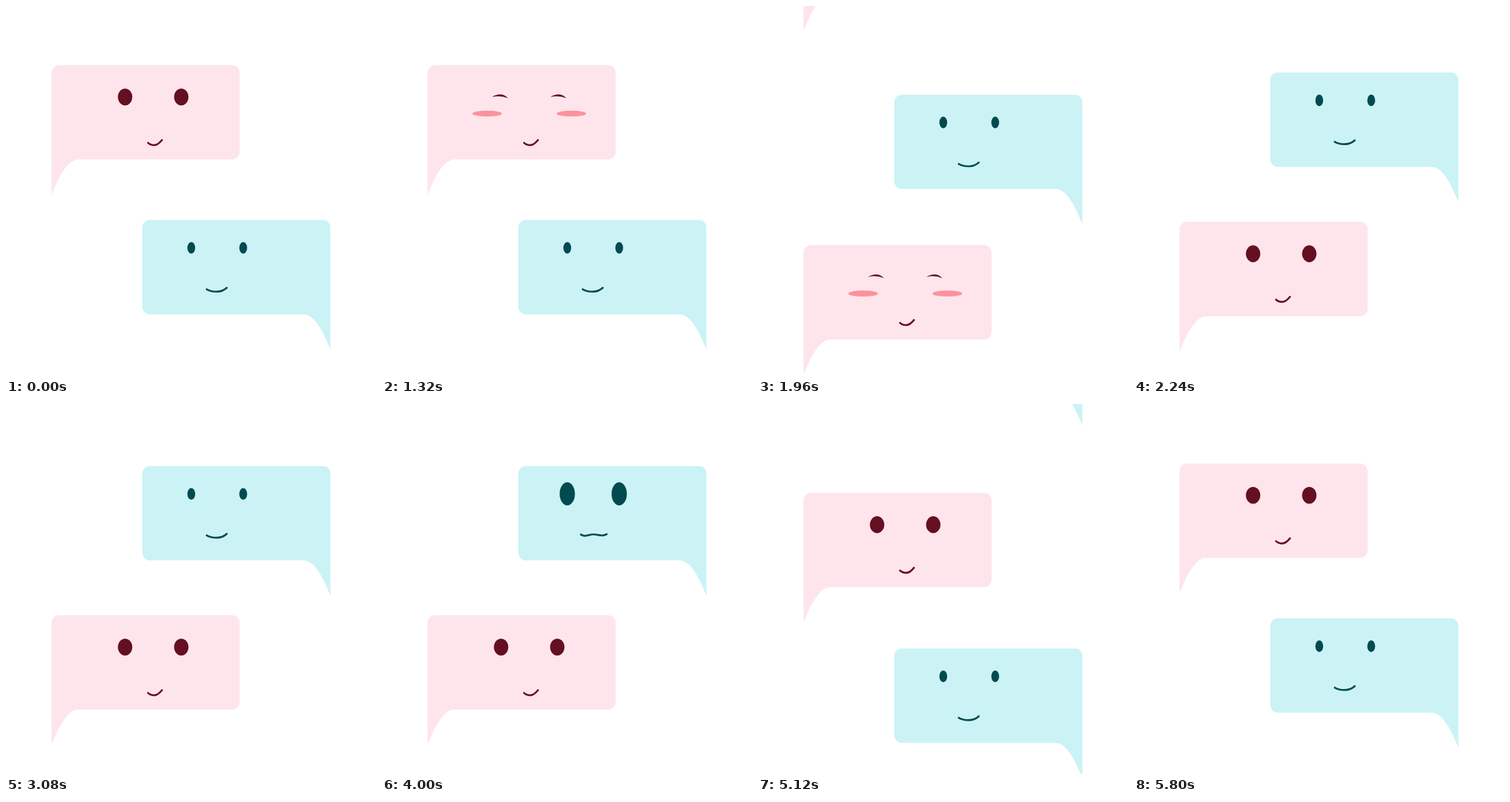
These frames come from a looping animation (540x540 px, 6.04 s). An HTML page with a canvas:

```html
<!DOCTYPE html>
<html lang="en">
<head>
<meta charset="utf-8">
<title>Chat bubbles</title>
<style>
  html, body { margin: 0; width: 100%; height: 100%; overflow: hidden; background: #fff; }
  canvas { display: block; }
</style>
</head>
<body>
<canvas id="stage" width="540" height="540"></canvas>
<script>
const ctx = document.getElementById('stage').getContext('2d');
const LOOP = 6040;
const PINK = { body: '#fee5eb', ink: '#641022', blush: '#fb929e' };
const BLUE = { body: '#cbf3f5', ink: '#004a50' };

// Start times of the four moves, in ms
const SMILE = 10, SCROLL_UP = 1560, WORRY = 3480, SCROLL_BACK = 4738;
const EYES_OPEN = 2000, BLUE_ENTERS = 4820;

// Resting tops of the bubbles
const PINK_HIGH = 86.3, PINK_LOW = 308.3, BLUE_HIGH = 90.5, BLUE_LOW = 312.3, BELOW = 540;
const PINK_GONE = -204, BLUE_GONE = -218;

const PINK_MOUTH = [206.5, 112.6, 209, 115.3, 212, 116.8, 216, 116.8, 221, 116.8, 225, 112.8, 228.3, 108.4];
const BLUE_SMILE = [292, 100.5, 296.5, 103.4, 302, 104.6, 307.5, 104.6, 313, 104.6, 318.5, 102.8, 323, 98.2];
const BLUE_WAVE = [289, 99.3, 296, 104.8, 301, 99.3, 309, 99.3, 316, 99.3, 322, 104, 329.5, 99];

const lerp = (a, b, k) => a + (b - a) * k;

// Critically damped spring from 0 to 1
function spring(ms, rate = 7.9) {
  const x = Math.max(0, ms) / 1000 * rate;
  return 1 - (1 + x) * Math.exp(-x);
}

function ellipse(x, y, rx, ry, color, alpha = 1) {
  ctx.globalAlpha = alpha;
  ctx.fillStyle = color;
  ctx.beginPath();
  ctx.ellipse(x, y, rx, ry, 0, 0, Math.PI * 2);
  ctx.fill();
  ctx.globalAlpha = 1;
}

// Body with its tail at the lower left
function bubble(color) {
  const left = 66.5, right = 341, bottom = 137.7, r = 11;
  ctx.fillStyle = color;
  ctx.beginPath();
  ctx.moveTo(left, 189.2);
  ctx.lineTo(left, r);
  ctx.arcTo(left, 0, left + r, 0, r);
  ctx.arcTo(right, 0, right, r, r);
  ctx.arcTo(right, bottom, right - r, bottom, r);
  ctx.lineTo(106, bottom);
  ctx.bezierCurveTo(90, bottom, 78, 161, left, 189.2);
  ctx.fill();
}

function mouth(points, color) {
  ctx.strokeStyle = color;
  ctx.lineWidth = 2.7;
  ctx.beginPath();
  ctx.moveTo(points[0], points[1]);
  ctx.bezierCurveTo(...points.slice(2, 8));
  ctx.bezierCurveTo(...points.slice(8));
  ctx.stroke();
}

function closedEye(x, alpha) {
  ctx.globalAlpha = alpha;
  ctx.fillStyle = PINK.ink;
  ctx.beginPath();
  ctx.moveTo(x - 11.6, 46.5);
  ctx.quadraticCurveTo(x + 2, 38.2, x + 11.6, 48.2);
  ctx.quadraticCurveTo(x + 1, 43.6, x - 11.6, 46.5);
  ctx.fill();
  ctx.globalAlpha = 1;
}

function at(y, draw) {
  if (y >= BELOW) return;
  ctx.save();
  ctx.translate(0, y);
  draw();
  ctx.restore();
}

function pinkBubble(y, closed, blush) {
  at(y, () => {
    bubble(PINK.body);
    const ry = lerp(12.3, 1.5, closed);
    const fade = Math.min(1, Math.max(0, closed * 3 - 2));
    for (const x of [173.8, 255.8]) {
      if (fade < 1) ellipse(x, 46.5, 10.5, ry, PINK.ink, 1 - fade);
    }
    if (fade > 0) {
      closedEye(172.2, fade);
      closedEye(257.4, fade);
    }
    for (const x of [153.4, 276.4]) ellipse(x, 70.7, 21.6, 4.3, PINK.blush, blush);
    mouth(PINK_MOUTH, PINK.ink);
  });
}

function blueBubble(y, worry) {
  at(y, () => {
    ctx.save();
    ctx.translate(540, 0);
    ctx.scale(-1, 1);
    bubble(BLUE.body);
    ctx.restore();
    for (const x of [270.4, 346.2]) {
      ellipse(x, 40.7, lerp(5.7, 11.6, worry), lerp(8.5, 17.6, worry), BLUE.ink);
    }
    mouth(BLUE_SMILE.map((v, i) => lerp(v, BLUE_WAVE[i], worry)), BLUE.ink);
  });
}

function draw(t) {
  ctx.fillStyle = '#fff';
  ctx.fillRect(0, 0, 540, 540);

  const up = spring(t - SCROLL_UP), back = spring(t - SCROLL_BACK);

  if (t < 2800) pinkBubble(lerp(PINK_HIGH, PINK_GONE, up), spring(t - SMILE, 16), spring(t - SMILE));

  const blueY = lerp(BLUE_LOW, BLUE_HIGH, up);
  blueBubble(lerp(blueY, BLUE_GONE, back), spring(t - WORRY));

  if (t > SCROLL_UP) {
    const happy = t < EYES_OPEN ? 1 : 0;
    const pinkY = lerp(BELOW, PINK_LOW, up);
    pinkBubble(lerp(pinkY, PINK_HIGH, back), happy, happy);
  }
  if (t > BLUE_ENTERS) blueBubble(lerp(BELOW, BLUE_LOW, back), 0);
}

const start = performance.now();
function tick() {
  draw((performance.now() - start) % LOOP);
  requestAnimationFrame(tick);
}
tick();
</script>
</body>
</html>
```
